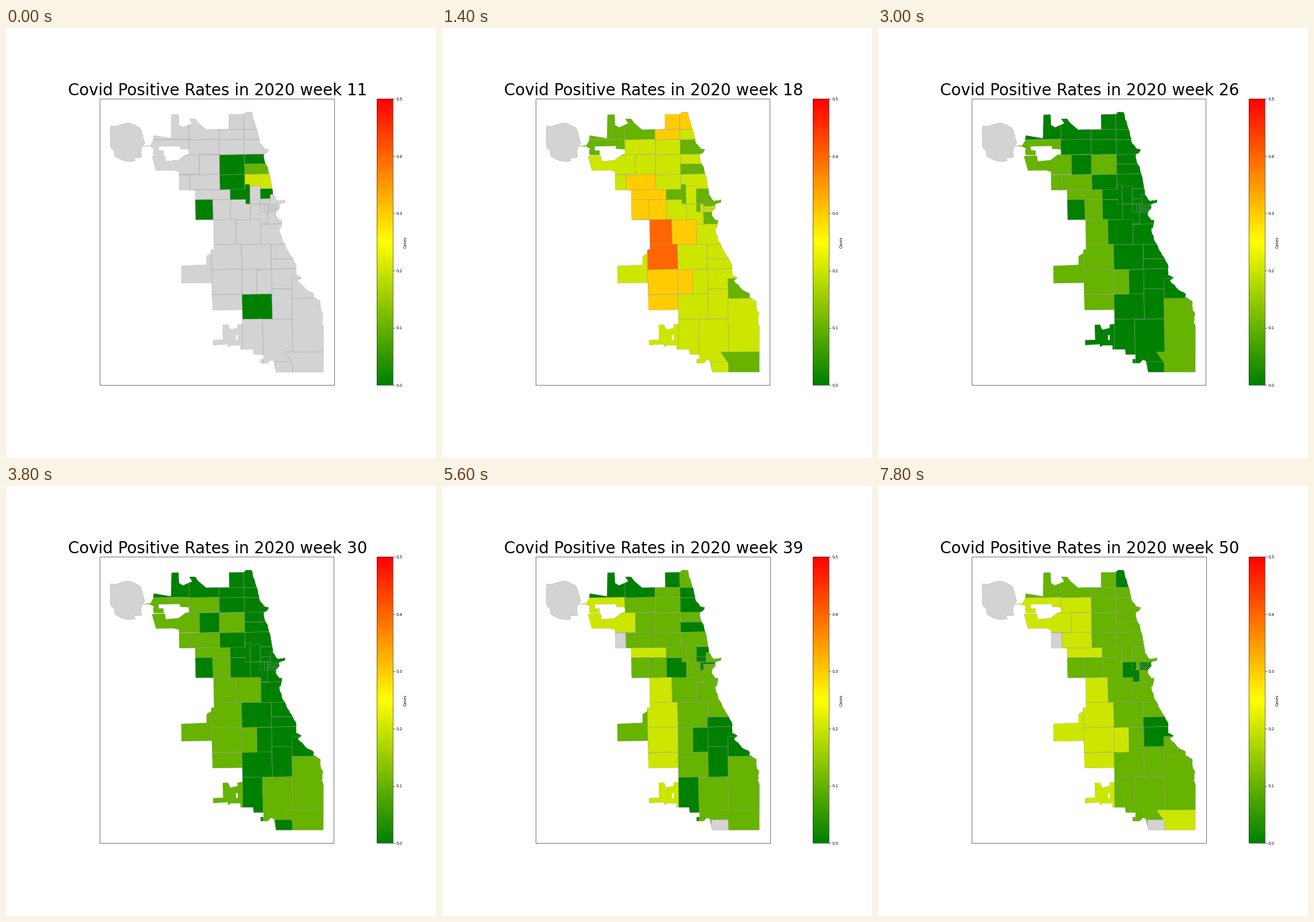
Animation of 748 by 748 pixels, one loop 8000 ms. Source, as a matplotlib script:

```python
import numpy as np
import matplotlib.pyplot as plt
from matplotlib.animation import FuncAnimation
from matplotlib.collections import PolyCollection
from matplotlib.colors import LinearSegmentedColormap
from matplotlib.patches import Polygon, Rectangle

SIZE, DPI = 748, 100
PX = 72 / DPI
FIRST_WEEK, WEEKS = 11, 40
KEY_WEEKS = [14, 21, 26, 34, 44, 50]
TILT = 1 / 60
NO_DATA, EDGE = "lightgray", "0.6"

# Tenths reached at the last four key weeks
CALM, EASING, LOW = (0, 0, 1, 1), (0, 0, 1, 0), (0, 0, 0, 0)
MILD, STEADY, RISING = (0, 1, 1, 1), (1, 1, 1, 1), (0, 1, 1, 2)
CLIMB, LATE, WEST = (1, 1, 1, 2), (0, 1, 2, 2), (1, 1, 2, 2)

plt.rcParams["font.family"] = "DejaVu Sans"
cmap = LinearSegmentedColormap.from_list("rates", ["green", "yellow", "red"])
rng = np.random.default_rng(7)


def rough(points, step=4, amount=0.7):
    """Break a path into short steps and shake them, like a natural edge."""
    path = []
    for a, b in zip(points, points[1:]):
        n = max(1, int(np.hypot(b[0] - a[0], b[1] - a[1]) / step))
        path += [tuple(np.add(a, np.subtract(b, a) * k / n)) for k in range(n)]
    path.append(points[-1])
    return [tuple(p + rng.uniform(-amount, amount, 2)) for p in path]


shore = rough([
    (427, 146), (436, 176), (442, 200), (450, 210), (457, 212), (454, 218),
    (448, 220), (450, 233), (455, 241), (458, 254), (463, 279), (464, 290),
    (473, 301), (485, 299), (485, 303), (475, 307), (476, 313), (470, 319),
    (470, 326), (475, 334), (480, 334), (478, 348), (475, 348), (480, 367),
    (492, 391), (505, 413), (505, 429), (514, 434), (508, 440), (521, 454),
    (536, 463), (534, 468), (546, 475), (548, 491), (552, 496), (549, 512),
    (552, 519),
])
south_west = [
    (552, 598.5), (470, 598.5), (466, 579), (461, 577), (455, 583),
    (443, 583), (443, 576), (448, 576), (448, 568), (431, 568), (430, 559),
    (408, 559), (408, 552), (391, 552), (386, 555), (386, 550), (360.5, 551.5),
    (360.5, 543), (378, 542.5), (377, 516.5), (386, 516), (390, 525),
    (403, 522), (403, 516), (411.5, 515), (411, 490), (359.5, 490.5),
    (358, 443), (305.5, 444), (305, 414), (349, 412), (349, 397), (357, 392),
    (357, 386), (362, 385), (361, 334), (330, 334), (329, 282), (301.5, 282),
]
north_west = [
    (301, 250), (292, 247.5), (261, 248), (254, 223), (276, 222), (278, 232),
    (300, 230), (312, 221), (318.5, 220), (318, 211), (303, 210), (302, 205),
    (265, 206), (266, 213), (274, 213), (274, 221), (257, 221), (256, 213),
    (258, 210), (251, 206), (238, 205.4), (251, 204.5), (256, 196), (257, 187),
    (287, 192), (288, 151), (300, 150.5), (301, 169), (308, 173), (324, 166),
    (319, 158), (329, 158), (334, 165), (348, 177), (388, 176), (388, 150.5),
    (414, 150), (418, 146),
]
airfield = rough([
    (182, 171), (196, 170), (213, 165), (233, 173), (241, 200), (235, 208),
    (235, 224), (224, 227), (224, 232), (204, 231), (190, 223), (189, 213),
    (182, 209), (182, 171),
], step=7, amount=1)

districts = []


def area(points, spring, may, trend, start=None, since=12, until=99):
    """Add a district; start is its first-week level, others begin later."""
    marks = np.array([spring, may, *trend])
    shift = rng.uniform(-0.4, 0.4)

    def colour(week):
        if week == FIRST_WEEK and start is not None:
            return cmap(start / 5)
        if not since <= week <= until:
            return NO_DATA
        level = round(np.interp(week, KEY_WEEKS, marks) + shift)
        return cmap(min(max(level, 0), 5) / 5)

    districts.append((points, colour))


def box(left, top, right, bottom, *spec, **limits):
    dx, dy = TILT * (bottom - top) / 2, TILT * (right - left) / 2
    area([(left - dx, top + dy), (right - dx, top - dy),
          (right + dx, bottom - dy), (left + dx, bottom + dy)],
         *spec, **limits)


def row(top, bottom, edges, *specs):
    for left, right, spec in zip(edges, edges[1:], specs):
        box(left, top, right, bottom, *spec)


# North side; later districts overlap earlier ones, the boundary clips all
row(140, 176.5, (388, 413.7, 445), (4, 2, CALM), (3, 2, EASING))
row(140, 194, (235, 318, 370.5), (1, 1, CALM), (1, 1, CALM))
row(176.5, 194, (370.5, 414, 445), (4, 2, MILD), (3, 1, CALM))
row(220.3, 255, (250, 336.5, 371.5, 415),
    (2, 2, WEST), (2, 2, LATE), (3, 2, STEADY, 0))
row(194.5, 222, (230, 318), (1, 1, WEST))
row(194, 220, (318, 371, 414.5, 462),
    (2, 2, RISING), (3, 2, MILD), (2, 1, CALM))
row(219.5, 236.5, (415, 462), (3, 1, CALM, 0))
row(236.5, 254, (415, 465), (2, 0, CALM, 1))
box(300.5, 255.5, 320, 284, 2, 2, WEST, until=30)
row(255, 281.5, (320, 372, 415.5), (3, 3, WEST), (2, 2, CALM, 0))
box(415.5, 254, 465, 279.5, 2, 1, CALM, 2)

# Centre
row(281.5, 299, (325, 390), (3, 2, WEST))
row(298.5, 333.5, (325, 360, 390.5, 425.5),
    (5, 2, CALM, 0), (4, 2, STEADY), (4, 1, CALM))
area([(390, 281), (416, 280.5), (416, 272), (424, 272), (425, 306),
      (417, 306), (417, 298), (390, 298.5)], 2, 1, CALM, 0)
box(424.5, 275, 442.5, 306, 2, 1, CALM)
box(442.5, 279.5, 468, 297, 2, 1, CALM, 0)
box(442.5, 297, 459.5, 306.5, 2, 1, CALM)
box(459.5, 289.5, 490, 307, 2, 0, CALM)
box(425.5, 306, 455, 341, 3, 1, EASING)
row(306.5, 320, (442.5, 449.5, 455), (1, 0, EASING), (3, 1, CALM))
for k in range(4):
    top = 306.5 + 3.4 * k
    box(455, top, 480, top + 3.4, 2, min(k, 1), EASING, since=18 if k else 12)
box(455, 320, 485, 341, 1, 1, CALM)
row(333.2, 376.8, (355, 400, 443.5), (4, 3, WEST), (3, 2, MILD))
box(443.5, 341, 490, 376.3, 3, 1, CALM)

# South side
box(295, 380, 358, 450, 2, 2, WEST)
row(376.5, 420, (357.5, 410, 461.5), (4, 3, WEST), (3, 2, MILD))
row(376, 401.5, (461.5, 510), (3, 1, CALM))
row(401.5, 418.8, (461.5, 515), (2, 1, LOW))
row(420, 463.2, (358, 410.7, 436.5, 462.5),
    (4, 2, WEST), (5, 1, CLIMB), (4, 1, CALM))
box(462.3, 418.8, 520, 453.5, 3, 1, LOW)
box(497.3, 435.5, 545, 470.5, 3, 1, CALM)
box(355, 463.7, 411, 492, 3, 2, WEST)
box(411, 463, 463, 506.5, 4, 1, CALM, 0)
box(463, 453.5, 498, 506, 3, 1, CALM)
box(498, 470, 558, 564, 3, 1, STEADY)
box(350, 510, 411.8, 562, 2, 1, LATE)
row(506.3, 590, (411.8, 447, 498.5), (4, 1, CALM), (3, 1, MILD))
box(468.5, 580.5, 498.5, 605, 2, 1, CALM, until=30)
area([(484.5, 563.5), (556, 563), (556, 602), (498.5, 602), (498, 583)],
     2, 1, WEST)

fig = plt.figure(figsize=(SIZE / DPI, SIZE / DPI), dpi=DPI, facecolor="white")
ax = fig.add_axes([0, 0, 1, 1])
ax.set_axis_off()

# Colour bar
ramp = np.linspace(1, 0, 256)[:, None]
ax.imshow(ramp, cmap=cmap, extent=(645.5, 673.5, 621.5, 123.5),
          aspect="auto", interpolation="nearest")
ax.set(xlim=(0, SIZE), ylim=(SIZE, 0))
thin = dict(fill=False, lw=0.56 * PX)
ax.add_patch(Rectangle((645.1, 123.1), 28, 498, **thin))
for i in range(6):
    y = 621.1 - 99.6 * i
    ax.plot([673.5, 676], [y, y], color="black", lw=0.56 * PX)
    ax.text(678.2, y + 0.4, f"{i / 10:.1f}", size=6.93 * PX,
            va="center_baseline")
ax.text(694.5, 372.5, "Cases", size=6.93 * PX, rotation=90,
        ha="center", va="center")

# Map
land = ax.add_patch(Polygon(shore + south_west + north_west,
                            facecolor=NO_DATA, edgecolor=EDGE, lw=0.4 * PX))
cells = PolyCollection([points for points, _ in districts],
                       edgecolors=EDGE, linewidths=0.45 * PX)
ax.add_collection(cells, autolim=False)
cells.set_clip_path(land)
ax.add_patch(Polygon(airfield, facecolor=NO_DATA, edgecolor=EDGE, lw=0.4 * PX))
ax.add_patch(Rectangle((400, 534), 3.5, 9, color="white", lw=0, zorder=3))
ax.plot([538, 551], [483.3, 483.3], color=EDGE, lw=0.4 * PX, zorder=3)

frame = ax.add_patch(Rectangle((163.1, 123.1), 408, 498, **thin))
title = ax.text(367.8, 116.8, "", size=27.7 * PX, ha="center", va="baseline")


def update(i):
    week = FIRST_WEEK + i
    title.set_text(f"Covid Positive Rates in 2020 week {week}")
    cells.set_facecolor([colour(week) for _, colour in districts])
    frame.set_width(407 if 12 <= week <= 30 else 408)
    return title, cells, frame


anim = FuncAnimation(fig, update, frames=WEEKS, interval=200, repeat=True,
                     repeat_delay=0, blit=False)
plt.show()
```
